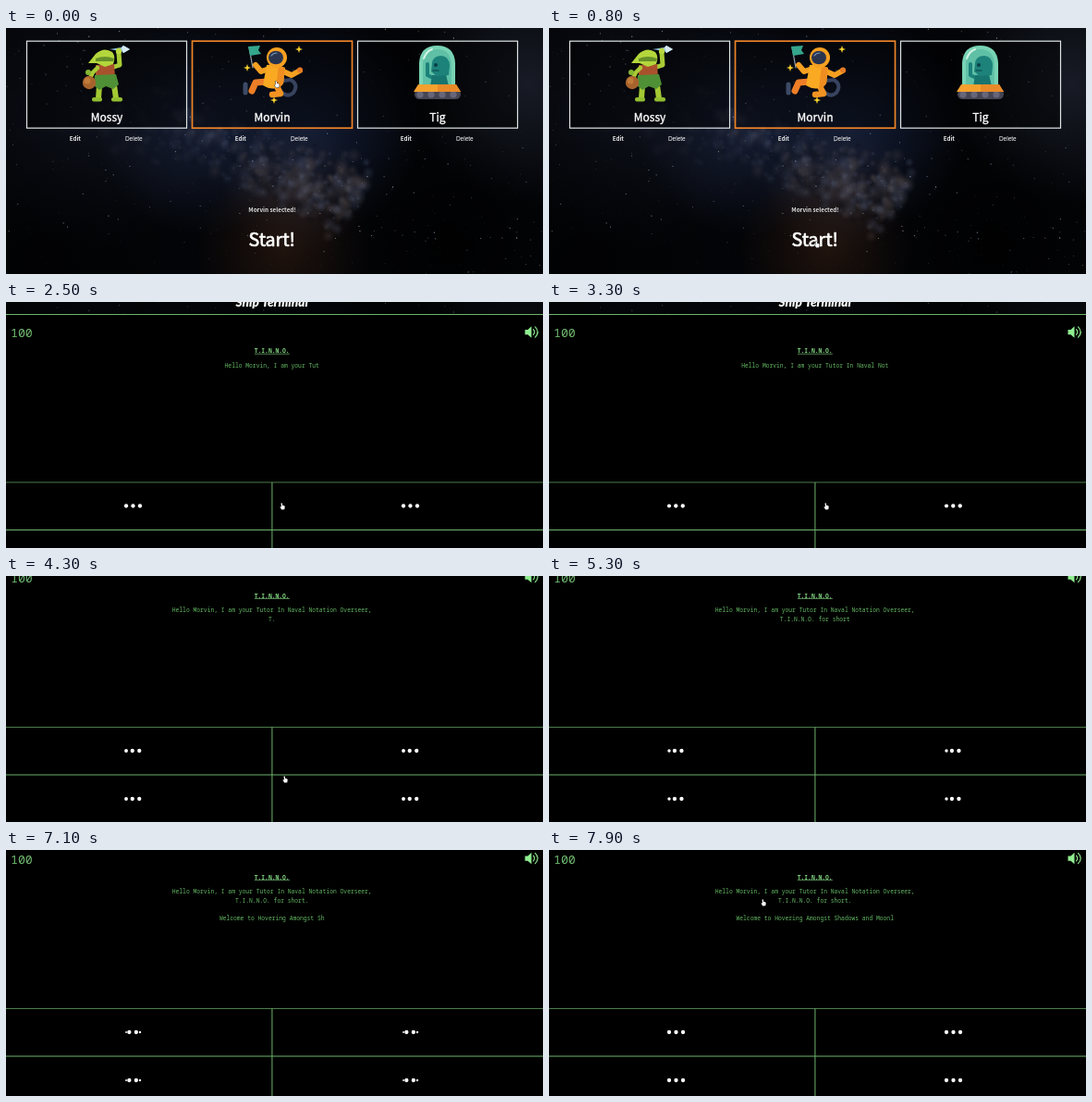
An HTML page with a canvas for the animation above (8000 ms loop, 581x266 px).

```html
<!DOCTYPE html>
<html lang="en">
<head>
<meta charset="utf-8">
<title>Ship Terminal</title>
<style>
html, body { margin: 0; width: 100%; height: 100%; overflow: hidden; background: #000; }
canvas { display: block; width: 581px; height: 266px; }
</style>
</head>
<body>
<canvas id="stage"></canvas>
<script>
const W = 581, H = 266, LOOP = 8000, STEP = 100;
const OPEN_TERMINAL = 1000;
const GREEN = '#90ee90', LINE = '#6db36d', DIM = '#4c7d4c';
const SANS = '"Noto Sans CJK JP", "Noto Sans CJK", "Noto Sans CJK SC", "Open Sans", sans-serif';
const MONO = '"Noto Sans Mono", "DejaVu Sans Mono", monospace';
const ratio = window.devicePixelRatio || 1;

function makeCanvas(el) {
  el.width = Math.round(W * ratio);
  el.height = Math.round(H * ratio);
  const c = el.getContext('2d');
  c.scale(ratio, ratio);
  return c;
}
const g = makeCanvas(document.getElementById('stage'));

// ---- helpers
function track(keys, t) {
  if (t <= keys[0][0]) return keys[0].slice(1);
  for (let i = 1; i < keys.length; i++) {
    const a = keys[i - 1], b = keys[i];
    if (t <= b[0]) {
      const k = (t - a[0]) / (b[0] - a[0]);
      return a.slice(1).map((v, j) => v + (b[j + 1] - v) * k);
    }
  }
  return keys[keys.length - 1].slice(1);
}
function random(seed) {
  return () => (seed = (seed * 16807) % 2147483647) / 2147483647;
}
function text(c, str, x, y, font, color, align = 'center') {
  c.font = font;
  c.fillStyle = color;
  c.textAlign = align;
  c.fillText(str, x, y);
}
// regular face thickened to a medium weight
function heavyText(c, str, x, y, size, extra) {
  text(c, str, x, y, `500 ${size}px ${SANS}`, '#fff');
  c.strokeStyle = '#fff';
  c.lineWidth = extra;
  c.lineJoin = 'round';
  c.strokeText(str, x, y);
}
function disc(c, x, y, r, color, ry = r) {
  c.fillStyle = color;
  c.beginPath();
  c.ellipse(x, y, r, ry, 0, 0, 7);
  c.fill();
}
function box(c, x, y, w, h, color, r = 0) {
  c.fillStyle = color;
  c.beginPath();
  c.roundRect(x, y, w, h, r);
  c.fill();
}
function shape(c, d, color) {
  c.fillStyle = color;
  c.fill(new Path2D(d));
}
function stroke(c, d, color, width) {
  c.strokeStyle = color;
  c.lineWidth = width;
  c.lineCap = c.lineJoin = 'round';
  c.stroke(new Path2D(d));
}
function glow(c, x, y, r, rgb, a) {
  const f = c.createRadialGradient(x, y, 0, x, y, r);
  f.addColorStop(0, `rgba(${rgb},${a})`);
  f.addColorStop(1, `rgba(${rgb},0)`);
  c.fillStyle = f;
  c.fillRect(x - r, y - r, 2 * r, 2 * r);
}

// ---- night sky
function paintSky(c) {
  const rnd = random(4711);
  c.fillStyle = '#030407';
  c.fillRect(0, 0, W, H);
  glow(c, 90, 90, 150, '24,30,46', .5);
  glow(c, 215, 105, 120, '34,46,80', .6);
  glow(c, 330, 105, 120, '28,42,78', .65);
  glow(c, 565, 60, 130, '40,46,62', .55);
  glow(c, 310, 175, 75, '58,52,58', .4);
  glow(c, 300, 240, 95, '58,32,18', .5);
  // grainy band of light, densest towards its lower right end
  for (let i = 0; i < 520; i++) {
    const k = Math.sqrt(rnd()), off = rnd() + rnd() + rnd() - 1.5;
    const x = 60 + 320 * k + off * 16, y = 62 + 125 * k - off * 34;
    const tone = ['104,116,150', '104,92,90', '2,3,8'][Math.floor(rnd() * 3)];
    glow(c, x, y, 2 + rnd() * 8, tone, .05 + .2 * k * k);
  }
  glow(c, 480, 235, 130, '0,0,0', .8);
  glow(c, 40, 255, 150, '0,0,0', .5);
  for (let i = 0; i < 1100; i++) {
    const x = rnd() * W, y = rnd() * H, m = Math.pow(rnd(), 3);
    const near = Math.exp(-Math.pow((y - 40 - x * .39) / 75, 2));
    if (rnd() > .3 + .6 * near) continue;
    c.globalAlpha = .15 + .55 * m;
    disc(c, x, y, .35 + .35 * m, rnd() > .8 ? '#e6cdbb' : '#a9bde0');
  }
  c.globalAlpha = 1;
}

// ---- crew portraits
function goblin(c) {
  stroke(c, 'M114 43 L123 40 L122 27', '#a9cc35', 5);
  shape(c, 'M112 23 L125 21 L127 19 L134 23 L127 27 L125 25 Z', '#8fc7e4');
  shape(c, 'M125 21 L127 19 L134 23 L127 27 Z', '#d5e8f1');
  disc(c, 122, 25, 3.2, '#b9d840');
  stroke(c, 'M101 62 L100 76 M117 62 L119 76', '#a4c934', 6);
  box(c, 93, 75, 11, 4.5, '#93bd31', 2);
  box(c, 114, 75, 12, 4.5, '#93bd31', 2);
  shape(c, 'M97 40 L117 39 L118 54 L97 54 Z', '#a9512c');
  shape(c, 'M96 51 L119 50 L122 61 L116 66 L108 63 L101 67 L95 62 Z', '#4f8f35');
  stroke(c, 'M99 43 L94 48 L91 54', '#a9cc35', 4.5);
  disc(c, 90, 59, 7.2, '#a8632c');
  disc(c, 88, 57, 3.5, '#c07a3a');
  disc(c, 89, 48, 3, '#86b733');
  shape(c, 'M89 38 L97 28 Q106 20 115 26 Q119 31 116 39 L107 42 L98 38 Z', '#b4d63c');
  shape(c, 'M97 33 Q107 29 117 33 L116 36 L97 36 Z', '#668f2a');
}
function sparkle(c, x, y, r) {
  const q = r * .25;
  shape(c, `M${x} ${y - r} L${x + q} ${y - q} L${x + r} ${y} L${x + q} ${y + q} L${x} ${y + r} L${x - q} ${y + q} L${x - r} ${y} L${x - q} ${y - q} Z`, '#f7cf2d');
}
function astronaut(c) {
  stroke(c, 'M297 68 Q304 76 311 70 Q317 61 308 56 L300 57', '#38445f', 4);
  stroke(c, 'M263 21 L267 43', '#9aa5ad', 1.2);
  shape(c, 'M262 20 L275 19 L273 24 L276 28 L264 30 Z', '#35a58c');
  stroke(c, 'M282 45 L276 47 L270 40', '#f6a021', 6);
  stroke(c, 'M300 47 L309 51 L318 46', '#f6a021', 6);
  disc(c, 318, 45.5, 3, '#e57a25');
  stroke(c, 'M282 58 L270 59 L266 68', '#ee7e27', 7);
  stroke(c, 'M293 63 L297 71 L288 72', '#f19322', 6.5);
  stroke(c, 'M259 61 L259 70', '#3d4a66', 5);
  shape(c, 'M282 40 Q292 38 302 43 L300 60 Q291 70 278 62 Z', '#f9a922');
  shape(c, 'M295 41 L302 43 L300 60 Q297 65 292 66 Z', '#ee8d20');
  disc(c, 293, 32, 11, '#f6a021');
  disc(c, 292, 32, 8, '#29344f', 7.3);
  stroke(c, 'M287 30 Q289 27 293 27', '#7590b5', 1.2);
  sparkle(c, 261, 43, 4);
  sparkle(c, 317, 23, 4);
  sparkle(c, 290, 78, 4);
}
function rover(c) {
  shape(c, 'M447 63 L447 38 Q448 19 466.500 19 Q485 19 486 38 L486 63 Z', '#78d3b4');
  shape(c, 'M451 63 L451 39 Q452 23 466.500 23 Q481 23 482 39 L482 63 Z', '#5fc0a6');
  stroke(c, 'M462 54 L456 51 L456 39', '#1c827a', 4);
  shape(c, 'M459 63 L461 51 L476 50 L479 63 Z', '#18746f');
  shape(c, 'M461 38 Q462 30 471 30 Q480 31 480 41 L479 51 L466 52 L460 47 Z', '#1c827a');
  disc(c, 465, 40, 2, '#0b3f48');
  stroke(c, 'M462 46 L468 46', '#0b3f48', 1.2);
  stroke(c, 'M452 33 Q455 25 461 23', '#d3f3e3', 2);
  box(c, 442, 66, 50, 11, '#454553', 5.5);
  for (let x = 448; x < 490; x += 12) disc(c, x, 72, 3.6, '#66667a');
  shape(c, 'M446 61 L487 61 L492 69 L441 69 Z', '#f4a12e');
  shape(c, 'M467 61 L487 61 L492 69 L467 69 Z', '#e88a27');
}

const crew = [
  { name: 'Mossy', x: 22.5, art: goblin },
  { name: 'Morvin', x: 201.5, art: astronaut, chosen: true },
  { name: 'Tig', x: 380.5, art: rover }
];
const sky = document.createElement('canvas');
paintSky(makeCanvas(sky));

const menu = document.createElement('canvas');
function paintMenu() {
  const c = makeCanvas(menu);
  c.drawImage(sky, 0, 0, W, H);
  for (const { name, x, art, chosen } of crew) {
    box(c, x, 14.5, 173, 93.5, 'rgba(0,0,0,.45)');
    c.lineJoin = 'miter';
    c.strokeStyle = chosen ? '#ee8428' : '#dfe6e6';
    c.lineWidth = chosen ? 1.7 : 1.2;
    c.strokeRect(x, 14.2, 173, 94);
    art(c);
    heavyText(c, name, x + 86.5, 101, 12, .35);
    text(c, 'Edit', x + 52.3, 122.300, 'bold 6.2px ' + SANS, '#eee');
    text(c, 'Delete', x + 115.800, 122, '6.5px "Liberation Sans", Arial, sans-serif', '#fff');
  }
  text(c, 'Morvin selected!', 288, 198.500, 'bold 6.3px ' + SANS, '#ddd');
  heavyText(c, 'Start!', 287.700, 236, 19.6, .7);
}
paintMenu();

// ---- terminal
const message = [
  'Hello Morvin, I am your Tutor In Naval Notation Overseer,',
  'T.I.N.N.O. for short.', '',
  'Welcome to Hovering Amongst Shadows and Moonlight'
].join('\n');
const typed = [[1050, 0], [1700, 12], [3300, 42], [4300, 60], [6200, 96], [7100, 111], [7900, 126], [8000, 128]];
const scroll = [[3400, 0], [3600, 16], [3900, 31.5], [5500, 31.5], [6100, 26.5], [6400, 26.5], [6900, 23.5]];
const pointer = [
  [0, 293, 61], [100, 293, 68], [400, 290, 155], [700, 288, 235], [800, 290, 234], [1000, 290, 233],
  [1700, 298, 221], [3300, 300, 221], [4300, 302, 220], [4700, 304, 220], [5200, 592, 130],
  [7200, 592, 130], [7300, 526, 112], [7500, 425, 78], [7700, 310, 48], [7900, 232, 57]
];

function easeOut(x) {
  let lo = 0, hi = 1;
  for (let i = 0; i < 24; i++) {
    const m = (lo + hi) / 2;
    if (1.5 * m * m - .5 * m * m * m < x) lo = m; else hi = m;
  }
  return 1.5 * lo - .5 * lo * lo * lo;
}
function dots(cx, cy, t) {
  const phase = (t - 1692) / 207, p = easeOut(phase - Math.floor(phase));
  const gap = 7.5, r = 2.15, x = cx - gap;
  disc(g, x, cy, r * p, '#fff');
  disc(g, x + gap * p, cy, r, '#fff');
  disc(g, x + gap * (1 + p), cy, r, '#fff');
  disc(g, x + gap * 2, cy, r * (1 - p), '#fff');
}
function speaker() {
  shape(g, 'M561.500 30 L564.500 30 L568.500 26.200 L568.500 38.800 L564.500 35.200 L561.500 35.200 Z', GREEN);
  stroke(g, 'M570.500 29.700 Q573 32.500 570.500 35.400', GREEN, 1.1);
  stroke(g, 'M572.500 26.900 Q578 32.500 572.500 38.200', GREEN, 1.1);
}
function terminal(t) {
  g.save();
  g.translate(0, -track(scroll, t)[0]);
  g.drawImage(sky, 0, 0, W, H);
  box(g, 0, 0, W, 14, 'rgba(0,0,0,.5)');
  text(g, 'Ship Terminal', 287.700, 4.500, 'italic 900 13.5px Lato, sans-serif', '#fff');
  box(g, 0, 13.5, W, 400, '#000');
  box(g, 0, 13, W, 1, LINE);
  text(g, '100', 5, 38, '300 13.2px ' + MONO, '#72bd72', 'left');
  speaker();

  text(g, 'T.I.N.N.O.', 287.700, 55, 'bold 6.32px ' + MONO, '#82d682');
  box(g, 268.800, 55.800, 38, .7, LINE);
  const count = Math.floor(track(typed, t)[0] + 1e-6);
  message.slice(0, count).split('\n').forEach((line, i) =>
    text(g, line, 287.700, 70.700 + i * 9.5, '6.32px ' + MONO, '#64b864'));

  box(g, 0, 194.500, W, 1, DIM);
  box(g, 0, 246, W, 1, LINE);
  box(g, 0, 298, W, 1, LINE);
  box(g, 287.400, 195, 1, 103, LINE);
  for (const y of [220.5, 272.5]) {
    dots(137.5, y, t);
    dots(437.5, y, t);
  }
  g.restore();
}

function hand(x, y) {
  g.save();
  g.translate(x, y);
  g.scale(.8, .85);
  const d = 'M-1.800 -4 Q-.9 -4.700 -.3 -3.800 L.2 -1.300 L2.400 -.9 Q3.500 -.5 3.300 .8 L2.800 3.900 L-1 4.100 L-3.100 .9 Q-3 -.1 -1.300 .6 Z';
  stroke(g, d, '#111', 1);
  shape(g, d, '#fff');
  g.restore();
}

function frame(now) {
  // the picture advances ten times a second
  const t = Math.floor((now % LOOP) / STEP) * STEP;
  if (t < OPEN_TERMINAL) g.drawImage(menu, 0, 0, W, H);
  else terminal(t);
  hand(...track(pointer, t));
}

let start;
function tick(now) {
  if (start === undefined) start = now;
  frame(Math.max(0, now - start));
  requestAnimationFrame(tick);
}
frame(0);
requestAnimationFrame(tick);
</script>
</body>
</html>
```
